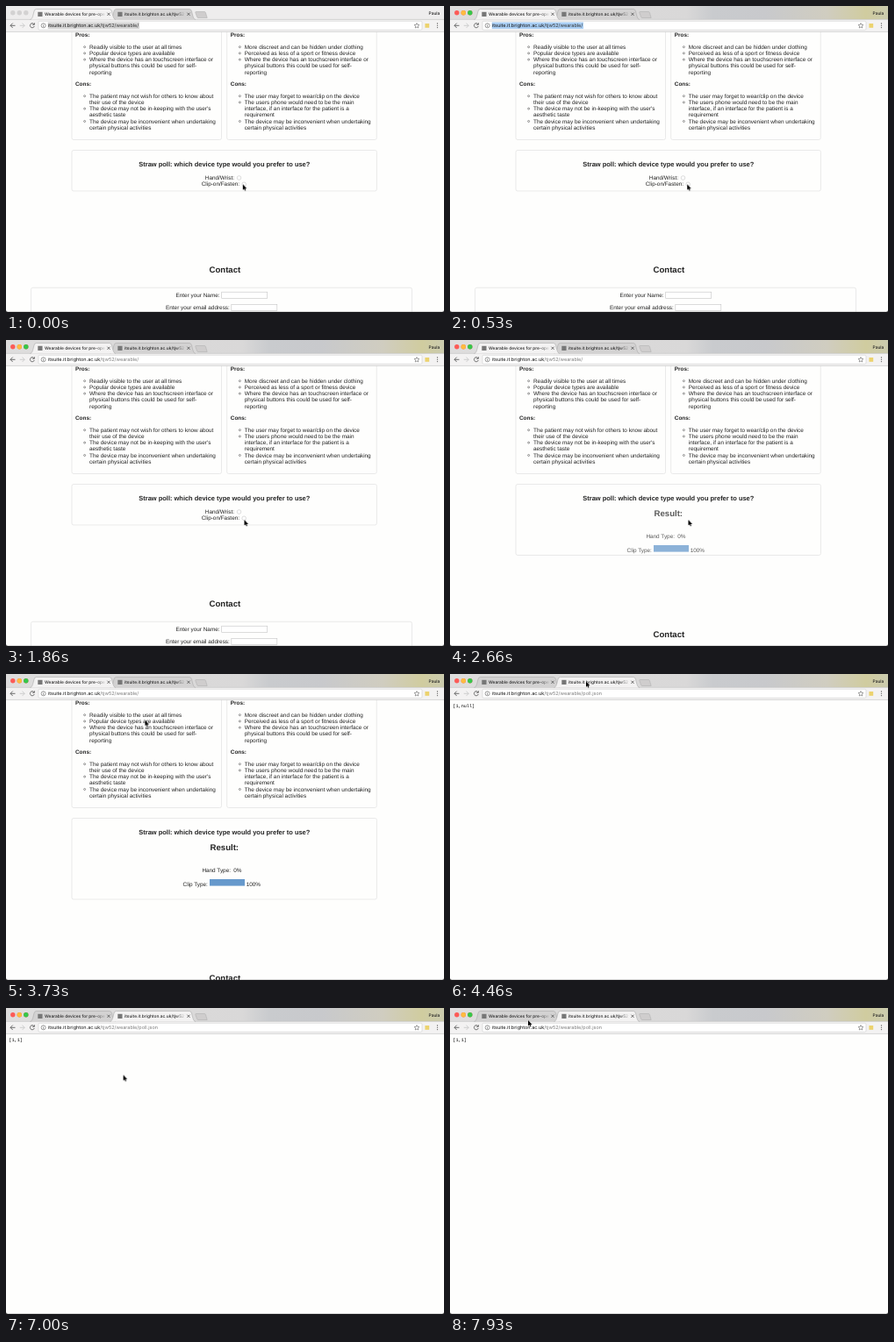
An HTML page for the animation above (8 s loop, 499x349 px).

```html
<!DOCTYPE html>
<html lang="en">
<head>
<meta charset="utf-8">
<title>Straw poll</title>
<style>
  html, body { margin: 0; width: 100%; height: 100%; overflow: hidden; background: #fefefd; }
  svg { display: block; width: 499px; height: 349px; }
  text { font: 6.4px "Liberation Sans", Arial, sans-serif; fill: #222; text-rendering: geometricPrecision; white-space: pre; }
  .b { font-weight: bold; }
  .mid { text-anchor: middle; }
  .h3 { font-size: 7.488px; font-weight: bold; }
  .h2 { font-size: 9.6px; font-weight: bold; }
  .ui { font: 500 4.85px Inter, Roboto, sans-serif; }
  .url { font-size: 5.5px; font-weight: 400; fill: #111; }
  .mono { font: 5.2px "Liberation Mono", monospace; fill: #000; }
  .card { fill: none; stroke: #e1e1e1; stroke-width: .7; }
  .field { fill: #fff; stroke: #c4c4c4; stroke-width: .6; }
  .icon { fill: none; stroke: #5c5c5c; stroke-width: .9; }

  .anim, .anim * { animation-duration: 8s; animation-iteration-count: infinite; animation-timing-function: step-end; }
  .idle { animation-name: idle; }
  .pick { animation-name: pick; }
  .path { animation-name: path; }
  .dot { animation-name: dot; }
  .form { animation-name: form; }
  .result { animation-name: result; }
  .grow { animation-name: grow; }
  .below { animation-name: below; }
  .first { animation-name: first; }
  .second { animation-name: second; }
  .before { animation-name: before; }
  .after { animation-name: after; }
  .pointer { animation-name: pointer; }

  @keyframes idle { 0% { opacity: 1 } 3.25%, 100% { opacity: 0 } }
  @keyframes pick { 0% { fill: #d4d4d4 } 3.25% { fill: #a8cdf3 } 16.6%, 100% { fill: transparent } }
  @keyframes path { 0% { fill: #333 } 16.6%, 100% { fill: #7d7d7d } }
  @keyframes dot { 0% { opacity: 0 } 26.6%, 100% { opacity: 1 } }
  @keyframes form { 0% { opacity: 1 } 30%, 100% { opacity: 0 } }
  @keyframes result {
    0% { opacity: 0 }
    30% { opacity: 0; animation-timing-function: ease-in-out }
    35%, 100% { opacity: 1 }
  }
  @keyframes grow {
    0% { height: 46.5px }
    30% { height: 46.5px; animation-timing-function: ease-in-out }
    35%, 100% { height: 92.5px }
  }
  @keyframes below {
    0% { transform: none }
    30% { transform: none; animation-timing-function: ease-in-out }
    35%, 100% { transform: translateY(46px) }
  }
  @keyframes first { 0% { visibility: visible } 54.1%, 100% { visibility: hidden } }
  @keyframes second { 0% { visibility: hidden } 54.1%, 100% { visibility: visible } }
  @keyframes before { 0% { opacity: 1 } 72.5%, 100% { opacity: 0 } }
  @keyframes after { 0% { opacity: 0 } 72.5%, 100% { opacity: 1 } }
  .anim .pointer { animation-timing-function: ease-in-out; }
  @keyframes pointer {
    0% { transform: translate(269.8px, 203.3px) }
    6.6%, 16.6% { transform: translate(270.2px, 203.3px) }
    22.5%, 36.5% { transform: translate(271.5px, 205px) }
    46.6% { transform: translate(158.4px, 52.6px) }
    51.6%, 56% { transform: translate(155px, 8.3px) }
    62.5%, 79.2% { transform: translate(166.7px, 100.4px) }
    83.2%, 84.2% { transform: translate(149.3px, 86.1px) }
    90%, 91.7% { transform: translate(124px, 70.3px) }
    93.2%, 95% { transform: translate(122.2px, 56.8px) }
    99.1%, 100% { transform: translate(89px, 13.9px) }
  }
</style>
</head>
<body>
<svg class="anim" viewBox="0 0 499 349">
  <defs>
    <linearGradient id="strip">
      <stop offset="0" stop-color="#dedddd"/>
      <stop offset=".54" stop-color="#d9d8d8"/>
      <stop offset=".6" stop-color="#c9cbce"/>
      <stop offset=".72" stop-color="#c8c9cc"/>
      <stop offset=".86" stop-color="#d0cdc0"/>
      <stop offset=".95" stop-color="#d0cc9f"/>
      <stop offset="1" stop-color="#cbcbae"/>
    </linearGradient>
    <linearGradient id="fade" gradientUnits="userSpaceOnUse" x1="102" x2="114">
      <stop offset="0" stop-color="#222"/>
      <stop offset="1" stop-color="#222" stop-opacity="0"/>
    </linearGradient>
    <path id="tab" d="M27.500 15.500C30 15 30.500 12 32 6Q32.600 3.500 34.500 3.500H118Q119.800 3.500 120.500 6C122 12 122.500 15 125 15.500" stroke="#aaa" stroke-width=".6"/>
    <g id="lights">
      <circle cx="7.800" cy="7.800" r="2.700"/><circle cx="15.300" cy="7.800" r="2.700"/><circle cx="22.800" cy="7.800" r="2.700"/>
    </g>
  </defs>

  <rect width="499" height="349" fill="#fefefd"/>

  <g class="first">
    <rect class="card" x="75" y="10" width="170.500" height="142.500" rx="2"/>
    <rect class="card" x="251.700" y="10" width="170.500" height="142.500" rx="2"/>
    <g id="lists"></g>

    <rect class="card grow" x="75" y="164.500" width="347.400" height="46.500" rx="2"/>
    <text class="h3 mid" x="248.800" y="182.700">Straw poll: which device type would you prefer to use?</text>
    <g class="form">
      <text x="226.800" y="197.800">Hand/Wrist:</text>
      <text x="222.700" y="205">Clip-on/Fasten:</text>
      <circle class="field" cx="265.500" cy="196" r="2.300"/>
      <circle class="field" cx="271.200" cy="203.300" r="2.300"/>
      <circle class="dot" cx="271.200" cy="203.300" r="1.200" fill="#444"/>
    </g>
    <g class="result">
      <text class="h2 mid" x="248.800" y="201.200">Result:</text>
      <text x="223.400" y="225.900">Hand Type:</text>
      <text x="259.200" y="225.900">0%</text>
      <text x="201.600" y="241.800">Clip Type:</text>
      <rect x="232" y="234" width="40" height="7.600" fill="#6699cc"/>
      <text x="273.700" y="241.800">100%</text>
    </g>

    <g class="below">
      <text class="h2 mid" x="249.400" y="304.300">Contact</text>
      <rect class="card" x="28.500" y="321.300" width="434" height="60" rx="2"/>
      <text x="193.500" y="331.900">Enter your Name:</text>
      <rect class="field" x="245.700" y="326.200" width="52" height="7.400"/>
      <text x="182" y="346">Enter your email address:</text>
      <rect class="field" x="256.800" y="340.300" width="52" height="7.400"/>
    </g>
  </g>

  <g class="second">
    <text class="mono before" x="3.300" y="38">[1,null]</text>
    <text class="mono after" x="3.300" y="38">[1,1]</text>
  </g>

  <!-- window frame -->
  <rect width="499" height="15.500" fill="url(#strip)"/>
  <use href="#lights" fill="#fc5b57"/>
  <circle cx="15.300" cy="7.800" r="2.700" fill="#fdbc40"/>
  <circle cx="22.800" cy="7.800" r="2.700" fill="#34c84a"/>
  <g class="idle">
    <rect width="499" height="15.500" fill="#eeeded"/>
    <use href="#lights" fill="#d3d2d2"/>
  </g>
  <path d="M216.500 6.500H226Q227 6.500 227.400 7.500L229.200 13.500H219Q218 13.500 217.600 12.500L215.800 7.500Q215.600 6.500 216.500 6.500Z" fill="#cfcdcd" stroke="#aaa" stroke-width=".5"/>
  <rect y="15.300" width="499" height="14.200" fill="#f3f2f2"/>
  <path d="M0 15.400H499" stroke="#b5b4b4" stroke-width=".5"/>
  <path d="M0 29.400H499" stroke="#bfbebe" stroke-width=".6"/>
  <g class="first">
    <use href="#tab" x="91" fill="#d3d2d2"/>
    <use href="#tab" fill="#f3f2f2"/>
  </g>
  <g class="second">
    <use href="#tab" fill="#d3d2d2"/>
    <use href="#tab" x="91" fill="#f3f2f2"/>
  </g>
  <g>
    <rect x="36.300" y="6.800" width="5.200" height="5.200" fill="#777"/>
    <text class="ui" x="44" y="11.200" style="fill:url(#fade)">Wearable devices for pre-ope</text>
    <path class="icon" d="M115.400 7.700l3.200 3.200m0-3.200l-3.200 3.200"/>
  </g>
  <g transform="translate(91)">
    <rect x="36.300" y="6.800" width="5.200" height="5.200" fill="#777"/>
    <text class="ui" x="44" y="11.200" style="fill:url(#fade)">itsuite.it.brighton.ac.uk/tjw52</text>
    <path class="icon" d="M115.400 7.700l3.200 3.200m0-3.200l-3.200 3.200"/>
  </g>
  <text class="ui" x="481.600" y="10">Paula</text>

  <path class="icon" d="M10.500 22.300H5M7.700 19.600L5 22.300L7.700 25"/>
  <path class="icon" d="M15.700 22.300H21.200M18.500 19.600L21.200 22.300L18.500 25" style="stroke:#cacaca"/>
  <path class="icon" d="M31.900 20.700A2.500 2.500 0 1 0 32.300 23M32.400 19.300V21.300H30.300"/>
  <rect x="37" y="17.300" width="437" height="10" rx="1.300" fill="#fff" stroke="#cfcfcf" stroke-width=".6"/>
  <circle class="icon" cx="42.600" cy="22.300" r="2.500" style="stroke-width:.6"/>
  <path class="icon" d="M42.600 21.900V23.800M42.600 20.600V21.300" style="stroke-width:.7"/>
  <rect class="pick" x="47.700" y="18.500" width="104.300" height="7.600"/>
  <text class="ui url" x="48" y="24.300">itsuite.it.brighton.ac.uk<tspan class="path">/tjw52/wearable/<tspan class="second">poll.json</tspan></tspan></text>
  <path d="M468 19.500l.85 1.900 2.050.2-1.550 1.400.45 2-1.800-1.050-1.800 1.050.45-2-1.550-1.400 2.050-.2z" fill="none" stroke="#666" stroke-width=".6"/>
  <rect x="477.400" y="20" width="4.800" height="4.800" fill="#ecd36e"/>
  <g fill="#606060"><circle cx="491.500" cy="20" r=".65"/><circle cx="491.500" cy="22.300" r=".65"/><circle cx="491.500" cy="24.600" r=".65"/></g>

  <path d="M0 346.500V349H2.500Q0 349 0 346.500ZM499 346.500V349H496.500Q499 349 499 346.500Z" fill="#111"/>
  <path d="M0 348.800H499" stroke="#777" stroke-width=".4"/>

  <path class="pointer" d="M0 0V6.500L1.500 5.200L2.500 7.400L3.500 7L2.500 4.900H4.500Z" fill="#000" stroke="#fff" stroke-width=".5" paint-order="stroke"/>
</svg>
<script>
  // A line starting with "+" continues the bullet above it.
  const device = ["Where the device has an touchscreen interface or", "+physical buttons this could be used for self-", "+reporting"];
  const activity = ["The device may be inconvenient when undertaking", "+certain physical activities"];

  const text = (x, y, str, cls = "") => `<text class="${cls}" x="${x}" y="${y}">${str}</text>`;

  function list(x, y, title, lines) {
    return text(x, y, title, "b") + lines.map((line, i) => {
      const base = y + 13.9 + i * 7.2;
      const bullet = line[0] === "+" ? "" :
        `<circle cx="${x + 10.6}" cy="${base - 2}" r="1" fill="none" stroke="#333" stroke-width=".5"/>`;
      return bullet + text(x + 16, base, line.replace("+", ""));
    }).join("");
  }

  document.getElementById("lists").innerHTML =
    list(79, 34.8, "Pros:", ["Readily visible to the user at all times", "Popular device types are available", ...device]) +
    list(79, 90.8, "Cons:", ["The patient may not wish for others to know about", "+their use of the device",
      "The device may not be in-keeping with the user's", "+aesthetic taste", ...activity]) +
    list(255.8, 34.8, "Pros:", ["More discreet and can be hidden under clothing", "Perceived as less of a sport or fitness device", ...device]) +
    list(255.8, 90.8, "Cons:", ["The user may forget to wear/clip on the device", "The users phone would need to be the main",
      "+interface, if an interface for the patient is a", "+requirement", ...activity]);
</script>
</body>
</html>
```
